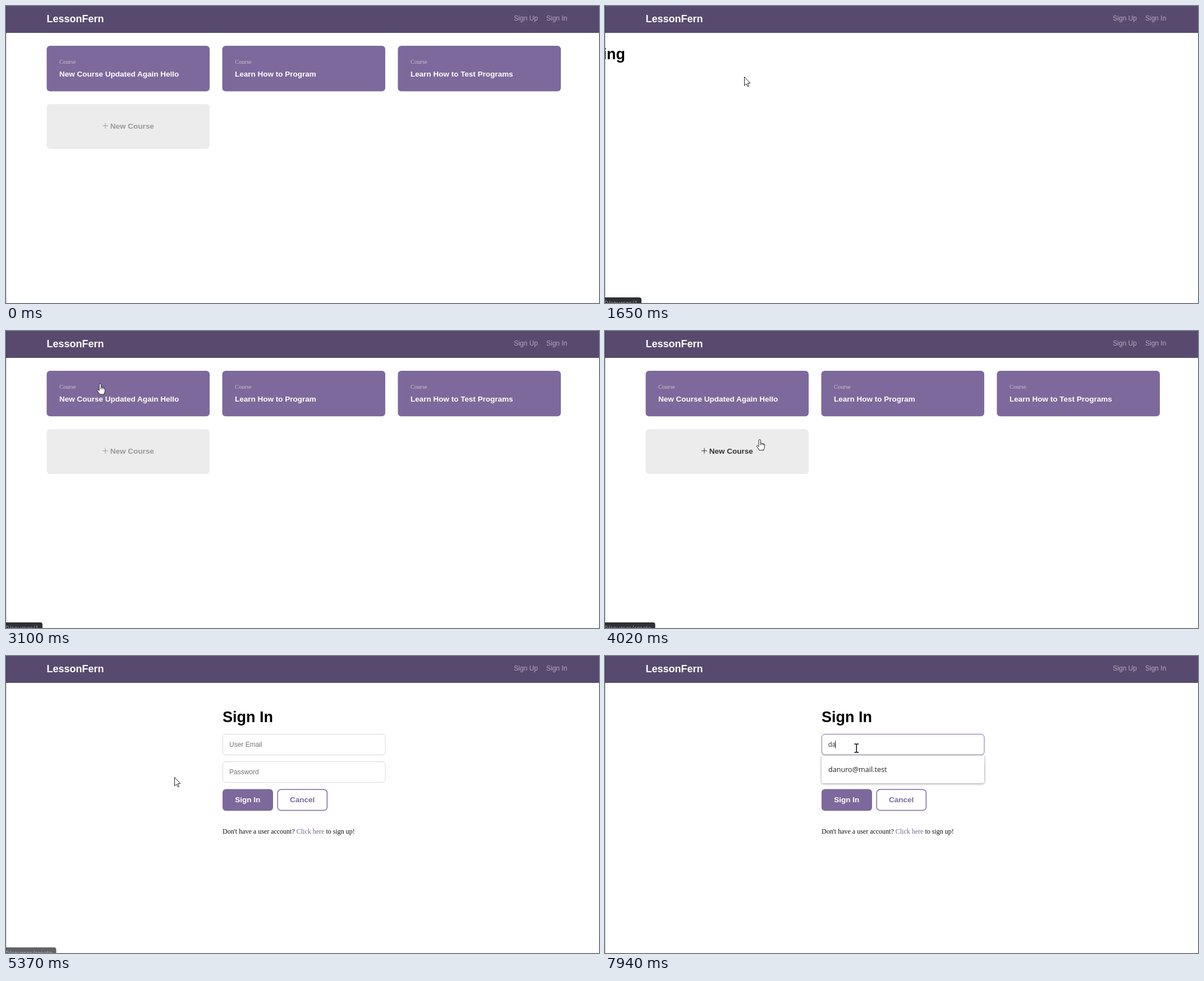
Write an HTML page that moves like this. It is 1057x530 px and loops after 8000 ms.

```html
<!DOCTYPE html>
<html lang="en">
<head>
<meta charset="utf-8">
<title>Course list demo</title>
<style>
  html, body { margin: 0; width: 100%; height: 100%; overflow: hidden; background: #fff; }
  svg { display: block; width: 100vw; height: 100vh; }
  text { font: 12px "Liberation Sans", Arial, sans-serif; white-space: pre; }
  .bold { font-size: 13.5px; font-weight: 700; }
  .serif { font-family: "Liberation Serif", "Times New Roman", serif; }
  .ui { font-family: "Open Sans", "Noto Sans", sans-serif; }
</style>
</head>
<body>
<svg id="stage" viewBox="0 0 1057 530" preserveAspectRatio="none"></svg>
<script>
const LOOP = 8000, TICK = 60;
const PURPLE = '#7d699b', DARK = '#584a6e';
const EMAIL = 'danuro@mail.test';

const text = (x, y, str, fill, cls = '', size = '', extra = '') =>
  `<text x="${x}" y="${y}" fill="${fill}" class="${cls}" style="${size ? `font-size:${size}px;` : ''}${extra}">${str}</text>`;
const box = (x, y, w, h, fill, attrs = '') =>
  `<rect x="${x}" y="${y}" width="${w}" height="${h}" rx="6" fill="${fill}" ${attrs}/>`;
const rule = y => `<path d="M769 ${y}H981" stroke="#dcdcdc"/>`;

function courseCard(title, i) {
  const x = 72.5 + 313 * i;
  return box(x, 71, 290.5, 81.3, PURPLE)
    + text(x + 22.5, 103, 'Course', '#cbc2d5', 'serif', 10.5)
    + text(x + 22.5, 126, title, '#fff', 'bold');
}

function listPage() {
  const titles = ['New Course Updated Again Hello', 'Learn How to Program', 'Learn How to Test Programs'];
  return titles.map(courseCard).join('')
    + box(72.5, 175, 290.5, 80, '#ececec')
    + `<g id="add" fill="#999" stroke="#999">
        <path d="M172 213.8h10M177 208.8v10"/>
        <text x="185.7" y="218.5" class="bold" stroke="none">New Course</text>
      </g>`;
}

function detailPage() {
  const items = ['1/2 x 3/4 inch parting strip', '1 x 2 common pine', '1 x 4 common pine',
    '1 x 10 common pine', '1/4 inch thick lauan plywood', 'Finishing Nails', 'Sandpaper',
    'Wood Glue', 'Wood Filler', 'Wemtol Oil Based Polyurethane'];
  const spaced = 'letter-spacing:1.5px';
  return `<path d="M0 48H1057V117H0Z" fill="#f7fefd"/><path d="M0 117.5H1057" stroke="#e6eeee"/>`
    + `<g id="back">${box(65.7, 64.2, 131.6, 37.3, '#fff', 'stroke="currentColor" stroke-width="1.5"')}`
    + text(87.3, 87, 'Return to List', 'currentColor', 'bold') + '</g>'
    + text(65, 174.5, 'Course', '#8e8e8e', 'serif', 13.5)
    + text(65, 219.5, 'New Course Updated Again Hello', '#2f2a40', 'bold', 36)
    + text(65, 250.5, 'art art', '#a09ba8', 'serif', 13.5)
    + text(65, 291, 'My course description. And again.Test', '#444', 'serif')
    + text(769, 172, 'ESTIMATED TIME', '#8e8e8e', 'serif', 10.5, spaced) + rule(183.5)
    + text(769, 203.5, '12 hours', '#000', 'bold')
    + text(769, 254.5, 'MATERIALS NEEDED', '#8e8e8e', 'serif', 10.5, spaced) + rule(266)
    + items.map((item, i) => {
        const y = 284.5 + 25.06 * i;
        return `<circle cx="775.2" cy="${y - 3}" r="2" fill="none" stroke="#111"/>` + text(784.3, y, item, '#111');
      }).join('');
}

function signInPage() {
  return text(386, 117.5, 'Sign In', '#000', 'bold', 27)
    + box(386.3, 139.5, 289.7, 37.2, '#fff', 'id="email" stroke="#dad7e2"')
    + box(386.3, 188.5, 289.7, 37.2, '#fff', 'stroke="#dad7e2"')
    + '<text id="typed" x="398" y="162"></text>'
    + '<path id="caret" stroke="#222"/>'
    + text(398, 211, 'Password', '#757575')
    + box(386, 237.5, 90, 38.8, PURPLE) + text(408.3, 261, 'Sign In', '#fff', 'bold')
    + box(484.2, 238.2, 88.2, 37.3, '#fff', `stroke="${PURPLE}" stroke-width="1.5"`)
    + text(506, 261, 'Cancel', PURPLE, 'bold')
    + text(386, 317, `Don't have a user account? <tspan fill="#76638f">Click here</tspan> to sign up!`, '#111', 'serif')
    + `<g id="suggest">
        <path d="M386 177H676V223q0 4-4 4H390q-4 0-4-4Z" fill="#fff" style="filter:drop-shadow(0 1px 2px rgba(0,0,0,.4))"/>
        <path d="M387 177.5H675" stroke="#eee"/>`
    + text(398, 207, EMAIL, '#222', 'ui', 12.6, 'font-weight:500') + '</g>';
}

document.getElementById('stage').innerHTML = `
  <rect width="1057" height="530" fill="#fff"/>
  <rect width="1057" height="48" fill="${DARK}"/>
  <g id="nav">
    ${text(72.5, 28.5, 'LessonFern', '#fff', 'bold', 18)}
    ${text(905.3, 25.7, 'Sign Up', '#b3a9c0')}${text(963, 25.7, 'Sign In', '#b3a9c0')}
  </g>
  <g id="list">${listPage()}</g>
  <g id="loading">${text(36, 95, 'Loading', '#000', 'bold', 27, 'text-anchor:end')}</g>
  <g id="detail">${detailPage()}</g>
  <g id="signin">${signInPage()}</g>
  <path d="M.5 0V530" stroke="#000" stroke-opacity=".2"/>
  <g id="status">
    <rect id="bubble" x="-20" y="520" height="30" rx="4" fill="#2f3033"/>
    <text id="url" class="ui" y="533.5" fill="#9da1a6" text-anchor="end" style="font-size:10.7px"></text>
  </g>
  <g id="pointer" stroke-linejoin="round">
    <path id="arrow" d="M.5.5V16L4 12.7 6.4 17.8 8.5 16.9 6.2 11.8H11Z" fill="#fff" stroke="#222"/>
    <g id="hand">
      <path d="M-1.8 11V1.5a1.6 1.6 0 0 1 3.2 0V6.5q1.6-.9 2.7.5 1.6-.8 2.5.6 1.9-.3 1.9 1.7V13q0 2-1.3 4V19H-1.2q-.8-2.5-3.8-6-1.2-2.2.5-2.4 1.2 0 2.7 2Z" fill="#fff" stroke="#222"/>
      <path d="M1.4 6.5V10M4.1 7V10M6.6 7.6V10.4" stroke="#222"/>
    </g>
    <path id="beam" d="M-4-7.5H-1.2L0-6.7 1.2-7.5H4M-4 7.5H-1.2L0 6.7 1.2 7.5H4M0-7V7" fill="none" stroke="#111" stroke-width="1.6"/>
    <circle id="press" r="12" fill="#ff0" fill-opacity=".55"/>
  </g>`;

const el = {};
document.querySelectorAll('[id]').forEach(node => el[node.id] = node);
const show = (node, on) => node.setAttribute('display', on ? 'inline' : 'none');
const within = (t, [from, to]) => t >= from && t < to;

const easeOut = p => 1 - (1 - p) ** 2;
const smooth = p => p * p * (3 - 2 * p);

// start time, number of ticks, destination, easing
const START = [821, 447];
const MOVES = [
  [430, 6, [427, 240], easeOut],
  [1040, 6, [248, 126], smooth],
  [2260, 7, [168, 94], smooth],
  [3600, 11, [300, 216], smooth],
  [5730, 7, [439.5, 175], smooth],
  [6150, 3, [448.3, 164.5], easeOut]
];
const PRESSES = [[1530, 1590], [2860, 2980], [4940, 5060], [6390, 6450]];
const BUSY = [[1590, 1710], [2980, 3100], [5060, 5120]];
const PAGES = [[0, 'list'], [1650, 'loading'], [1710, 'detail'], [3040, 'loading'], [3100, 'list'], [5120, 'signin']];
// from, fade start, bubble width, address
const STATUS = [
  [1530, 1960, 65, '0/courses/1'],
  [2740, 3100, 13, '0'],
  [3100, 4020, 65, '0/courses/1'],
  [4020, 5370, 89.5, '0/courses/create']
];

function pointerAt(t) {
  let pos = START;
  for (const [start, n, to, ease] of MOVES) {
    if (t < start) break;
    const e = ease(Math.min(1, (Math.floor((t - start) / TICK) + 1) / n));
    pos = pos.map((v, i) => v + (to[i] - v) * e);
  }
  return pos;
}

const lastBefore = (rows, t) => rows.filter(row => row[0] <= t).pop();

function drawStatus(t) {
  const row = lastBefore(STATUS, t);
  show(el.status, row);
  if (!row) return;
  const [, fade, width, url] = row;
  const opacity = t < fade ? 1 : Math.max(0, 1 - (Math.floor((t - fade) / TICK) + 1) / 4);
  el.status.setAttribute('opacity', opacity);
  el.bubble.setAttribute('width', width + 20);
  el.url.setAttribute('x', width - 7);
  el.url.textContent = url;
}

function drawForm(t) {
  const count = t < 7820 ? 0 : t < 7940 ? 1 : 2;
  const focused = t >= 6450;
  el.email.setAttribute('stroke', focused ? PURPLE : '#dad7e2');
  el.typed.textContent = count ? EMAIL.slice(0, count) : 'User Email';
  el.typed.setAttribute('fill', count ? '#444' : '#757575');
  el.caret.setAttribute('d', `M${397.5 + 6.6 * count} 151V165`);
  show(el.caret, focused && !within(t, [7010, 7510]));
  show(el.suggest, focused);
}

function draw(t) {
  const page = lastBefore(PAGES, t)[1];
  for (const name of ['list', 'loading', 'detail', 'signin']) show(el[name], name === page);
  el.nav.setAttribute('transform', `translate(${page === 'detail' ? -7.5 : 0} 0)`);

  const [x, y] = pointerAt(t);
  const over = (x0, y0, x1, y1) => x >= x0 && x < x1 && y >= y0 && y < y1;
  const onAdd = page === 'list' && t >= 370 && over(72, 175, 363, 255);
  const onCard = page === 'list' && over(72, 71, 989, 152) && (x - 72.5) % 313 < 290.5;
  const onBack = page === 'detail' && over(65, 63, 198, 102);
  const onField = page === 'signin' && (over(386, 139, 677, 177) || over(386, 188, 677, 226));

  const addColor = onAdd ? '#333' : '#999';
  el.add.setAttribute('fill', addColor);
  el.add.setAttribute('stroke', addColor);
  el.back.setAttribute('color', onBack ? DARK : PURPLE);

  const busy = BUSY.some(span => within(t, span));
  const shape = onField ? 'beam' : !busy && (onAdd || onCard || onBack) ? 'hand' : 'arrow';
  for (const name of ['arrow', 'hand', 'beam']) show(el[name], name === shape);
  show(el.press, PRESSES.some(span => within(t, span)));
  show(el.pointer, t >= 370);
  el.pointer.setAttribute('transform', `translate(${x} ${y})`);

  drawStatus(t);
  drawForm(t);
}

const origin = performance.now();
function frame() {
  draw((performance.now() - origin) % LOOP);
  requestAnimationFrame(frame);
}
frame();
</script>
</body>
</html>
```
